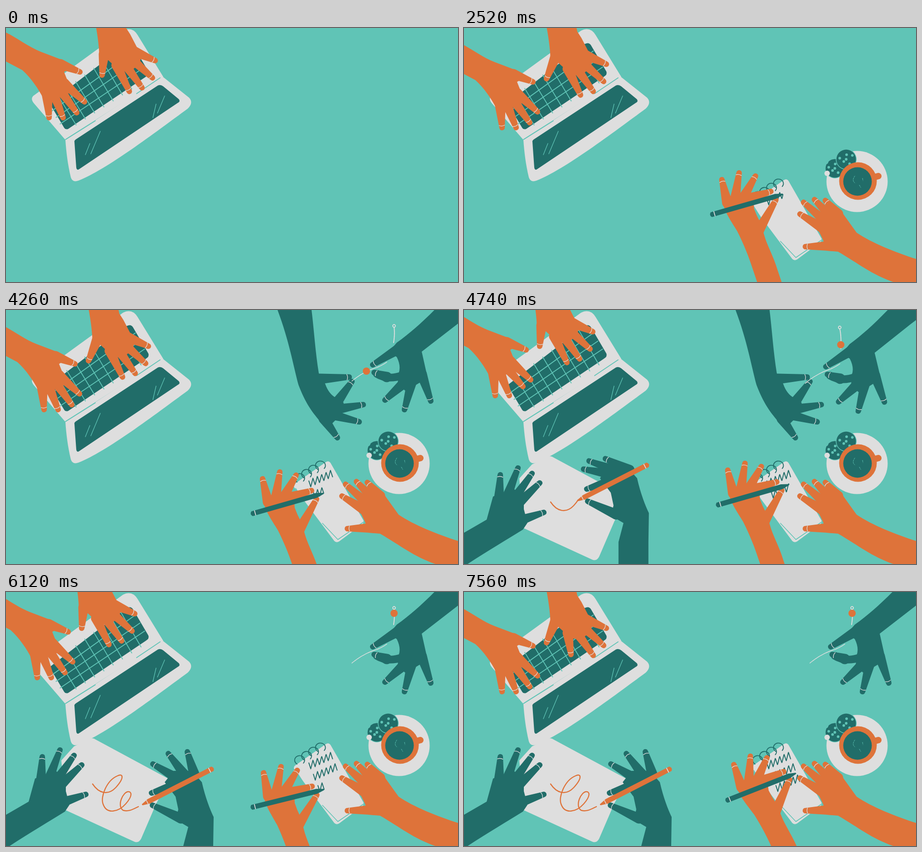
Animation, 997 px wide and 561 px high, one loop 7.62 s. Source, as an HTML page with a canvas:

```html
<!DOCTYPE html>
<html lang="en">
<head>
<meta charset="utf-8">
<title>Busy hands</title>
<style>
html, body { margin: 0; width: 100%; height: 100%; overflow: hidden; background: #60c4b6; }
canvas { display: block; width: 997px; height: 561px; }
</style>
</head>
<body>
<canvas id="stage" width="997" height="561"></canvas>
<script>
const ctx = document.getElementById('stage').getContext('2d');
const TEAL = '#60c4b6', DARK = '#216d69', ORANGE = '#de733a', GREY = '#dedede';
const LOOP = 7620, STEP = 60;

// ---------- helpers ----------
const clamp = x => Math.max(0, Math.min(1, x));
const mix = (a, b, u) => a + (b - a) * u;
const mixPt = (p, q, u) => p.map((v, i) => mix(v, q[i], u));
const span = (t, a, b) => clamp((t - a) / (b - a));
const ease = u => u * u * (3 - 2 * u);

function shape(d, color) {
  ctx.fillStyle = color;
  ctx.fill(new Path2D(d));
}
function disc(x, y, r, color) {
  ctx.fillStyle = color;
  ctx.beginPath();
  ctx.arc(x, y, r, 0, 7);
  ctx.fill();
}
function stroke(d, color, width, dash = []) {
  ctx.strokeStyle = color;
  ctx.lineWidth = width;
  ctx.lineCap = ctx.lineJoin = 'round';
  ctx.setLineDash(dash);
  ctx.stroke(new Path2D(d));
  ctx.setLineDash([]);
}
function line(pts, color, width) {
  if (pts.length > 1) stroke('M' + pts.map(p => p.join()).join('L'), color, width);
}
function placed(dx, dy, draw, deg = 0, px = 0, py = 0) {
  ctx.save();
  ctx.translate(dx + px, dy + py);
  ctx.rotate(deg * Math.PI / 180);
  ctx.translate(-px, -py);
  draw();
  ctx.restore();
}
// Tapered limb with a pale nail line, drawn along its own axis
function finger([x0, y0], [x1, y1], color, r0 = 11.5, r1 = 6) {
  const len = Math.hypot(x1 - x0, y1 - y0), k = Math.acos((r0 - r1) / len);
  ctx.save();
  ctx.translate(x0, y0);
  ctx.rotate(Math.atan2(y1 - y0, x1 - x0));
  ctx.fillStyle = color;
  ctx.beginPath();
  ctx.arc(0, 0, r0, k, 2 * Math.PI - k);
  ctx.arc(len, 0, r1, -k, k);
  ctx.fill();
  stroke(`M${len - 5},${-r1}q3,${r1} 0,${2 * r1}`, GREY, 1.3);
  ctx.restore();
}
// Finger roots are spread evenly from knuckle a to knuckle b
function hand(palm, color, a, b, tips, thumbs) {
  shape(palm, color);
  tips.forEach((tip, i) => finger(mixPt(a, b, i / (tips.length - 1)), tip, color));
  thumbs.forEach(([root, tip]) => finger(root, tip, color));
}
function pencil(x0, y0, x1, y1, color, lead) {
  const len = Math.hypot(x1 - x0, y1 - y0);
  ctx.save();
  ctx.translate(x1, y1);
  ctx.rotate(Math.atan2(y1 - y0, x1 - x0));
  shape(`M${-len + 3},-5.5L-17,-5.5L-1,-1.5Q1,0 -1,1.5L-17,5.5L${-len + 3},5.5Q${-len - 3},0 ${-len + 3},-5.5Z`, color);
  stroke(`M${-len + 10},-5v10`, GREY, 1.8);
  if (lead) stroke('M-13,-4v8', GREY, 1.6);
  ctx.restore();
}

// ---------- laptop ----------
function laptop() {
  shape('M60,150Q53,157 63,168L130,246L347,108L290,15Q278,-4 258,6Z', GREY);
  shape('M131,247L345,107L404,154Q414,165 401,178C330,230 220,314 160,337Q147,342 143,330C136,300 133,275 131,247Z', GREY);
  shape('M96,166L265,36Q275,30 280,38L314,96Q317,103 308,108L137,223Q131,225 128,220Z', DARK);
  const at = (u, v) => mixPt(mixPt([96, 166], [275, 33], u), mixPt([132, 224], [316, 104], u), v);
  for (let i = 1; i < 4; i++) line([at(-.02, i / 4), at(1, i / 4)], TEAL, 2);
  for (let i = 1; i < 9; i++) line([at(i / 9, -.05), at(i / 9, 1.06)], TEAL, 1.8);
  stroke('M132,246L197,205M288,145L340,110', TEAL, 1.8);
  shape('M151,252Q150,249 154,246L335,127Q341,124 347,129L381,157Q386,162 378,166L161,312Q156,315 155,308Z', DARK);
  stroke('M208,228L187,278M185,255L175,280M350,150L334,188M331,168L324,198', TEAL, 1.3);
}

// Rest spots: arrival time, left offset, right offset
const SPOTS = [
  [0, 0, 0, 0, 0], [480, -11, 22, -15, 8], [1140, 0, 0, -23, 0],
  [2280, -11, 22, -15, 8], [4740, -26, -9, -45, -24], [6900, -11, 22, -15, 8]
];
function typing(t) {
  const i = Math.max(0, SPOTS.findLastIndex(s => s[0] - 420 <= t));
  const beat = Math.floor(t / 100);
  const u = i ? ease(span(beat * 100, SPOTS[i][0] - 420, SPOTS[i][0] - 60)) : 0;
  const [, lx, ly, rx, ry] = mixPt(SPOTS[Math.max(0, i - 1)], SPOTS[i], u);
  const leftTap = beat % 8 === 7 ? 9 : 0, rightTap = beat % 8 === 3;
  placed(lx, ly, () => hand(
    'M-60,-22L0,10C25,22 50,42 78,53L120,69L150,85L128,97L134,112L142,142L126,150L98,156L82,155C72,135 55,110 36,93L0,74L-60,45Z',
    ORANGE, [91, 150], [128, 122],
    [[95, 198], [126, 198], [156, 187 - leftTap], [173, 163]], [[[120, 80], [163, 97]]]));
  placed(rx, ry, () => hand(
    'M188,-60L199,0C204,30 206,50 206,75L222,68L252,95L275,95L292,82L300,62L288,41L274,14L265,0L252,-60Z',
    ORANGE, [244, 82], [283, 52],
    [rightTap ? [251, 130] : [272, 140], [300, 132], [323, 110], [329, 72]],
    [[[216, 58], [mix(212, 197, clamp(ly / 22)), 104]]]));
}

// ---------- notebook and coffee ----------
function cookie(x, y, r) {
  disc(x, y, r + 1.5, TEAL);
  disc(x, y, r, DARK);
  for (let i = 0; i < 6; i++) {
    const a = i * 2.4, d = r * .75 * Math.sqrt(i / 5);
    disc(x + d * Math.cos(a), y + d * Math.sin(a), 2.9, TEAL);
  }
}
function coffee() {
  disc(867, 339, 67.5, GREY);
  cookie(818, 310, 20.5);
  disc(801, 321, 6, GREY);
  disc(798, 295, 6, TEAL);
  cookie(843, 290, 21.5);
  stroke('M900,331L914,327', ORANGE, 14);
  disc(869, 338, 41.5, ORANGE);
  disc(868, 339, 31.5, DARK);
  stroke('M862,327Q855,337 862,342M872,347L875,352M879,332L880,337', TEAL, 1, [3, 2]);
}

const ROWS = 3, FIRST = 1440, EACH = 2130, WRITE = 1600;
function zig(row, u) {
  const wave = Math.asin(Math.cos((u - .08) * 11 * Math.PI)) * 2 / Math.PI;
  return [668 + 10 * row + 53 * u, 384 + 25 * row - 24 * u + 8.5 * wave];
}
function penTip(t) {
  const row = Math.max(0, Math.min(ROWS - 1, Math.floor((t - FIRST) / EACH)));
  const s = t - FIRST - row * EACH;
  const next = row < ROWS - 1 ? zig(row + 1, 0) : [731, 397];
  return mixPt(zig(row, span(s, 0, WRITE)), next, ease(span(s, WRITE, 1950)));
}
function notebook(t) {
  shape('M704,337Q711,331 716,338L788,464Q791,469 786,473L735,511Q729,515 724,510L636,392Q633,387 638,383Z', GREY);
  stroke('M698,471L732,507L789,468M639,394L658,424', TEAL, 1.6);
  for (let i = 0; i < 4; i++)
    stroke(`M${642 + 15.3 * i},${380 - 9.3 * i}a11,10 0 1 1 14,-2`, DARK, 1.8);
  for (let row = 0; row < ROWS; row++) {
    const u = span(t - FIRST - row * EACH, 0, WRITE), pts = [];
    for (let v = 0; v < u; v += .01) pts.push(zig(row, v));
    line(pts, DARK, 2);
  }
  hand('M1060,532L997,510C950,495 900,475 866,452L833,406L805,404L785,412L776,435L792,468L800,492L825,494C870,520 900,545 947,561L1000,600Z',
    ORANGE, [825, 411], [790, 441],
    [[797, 381], [773, 379], [749, 385], [741, 411]], [[[812, 481], [753, 483]]]);
  const [x, y] = penTip(t);
  const tilt = 2 * span(t, 5600, 5900) - 7.5 * ease(span(t, 6300, 7500));
  placed(x - 676, y - 393, () => {
    hand('M542,405L570,396L610,392L612,425L618,440L626,456L634,482C640,505 655,530 664,561L694,650L640,650L610,561C600,530 590,505 575,475C560,450 545,430 542,405Z',
      ORANGE, [553, 412], [602, 402],
      [[541, 361], [579, 346], [615, 353], [649, 387]], [[[623, 472], [660, 406]]]);
    pencil(515, 439, 676, 393, DARK);
  }, tilt, 676, 393);
}

// ---------- beads ----------
function beading(t) {
  const pull = ease(span(t, 4440, 5100)) * (1 - ease(span(t, 5280, 5760)));
  const sway = Math.sin(t / 130) * 2 * span(t, 2640, 2800) * (1 - span(t, 4080, 4240));
  const [rx, ry] = mixPt([856 + sway, 35], [793, 43], pull);
  const low = mixPt([855, 72], [800, 104], pull);
  stroke(`M${rx},${ry + 3}Q${rx + 2 + 4 * pull},${ry + 18} ${low}`, GREY, 2, [5, 1]);
  stroke(`M${rx - 3},${ry}a3,3 0 1 1 0,.1`, GREY, 1.8);

  const strung = t >= 4500;
  const bead = strung
    ? mixPt(low, [rx + 4 * pull, ry + 12], ease(span(t, 4560, 5100)))
    : mixPt(mixPt([774, 149], [795, 135], ease(span(t, 2700, 3900))), [812, 128], span(t, 4290, 4500));
  if (strung) disc(...bead, 8, ORANGE);

  const out = ease(span(t, 5580, 5940));
  if (out < 1) placed(-110 * out, -330 * out, () => hand(
    'M588,-30L599,0C625,70 633,120 645,165C660,205 675,225 692,245L715,255L735,235L745,205L728,194Q712,186 704,163L690,140C682,90 680,50 674,0L672,-30Z',
    DARK, [727, 220], [701, 240], [[788, 209], [779, 247], [731, 282]],
    [[[692, 152], [757, 148]], [[730, 204], [763, 158]]]));

  placed(-25 * pull, 10 * pull, () => {
    stroke('M818,141Q842,156 875,144', DARK, 17);
    hand('M990,-40L945,0C915,30 890,52 862,72L845,92L862,104Q872,124 866,140L864,162L880,178L905,165L930,150L917,92L997,30L1080,-30Z',
      DARK, [877, 162], [917, 142], [[836, 199], [879, 220], [937, 201]],
      [[[866, 86], [809, 121]], [[840, 148], [812, 138]]]);
    stroke('M763,157Q782,141 806,131Q826,125 840,115', GREY, 1.5, [6, 1]);
  }, -2 * pull, 803, 120);
  if (!strung) disc(...bead, 8, ORANGE);
}

// ---------- drawing ----------
const LOOPS = 'M191,424C205,445 225,450 242,432C262,410 258,400 246,406C222,416 208,452 214,468C222,492 248,486 264,468C280,450 277,441 270,441C258,441 244,472 258,482C270,486 280,480 292,474';
const track = document.createElementNS('http://www.w3.org/2000/svg', 'path');
track.setAttribute('d', LOOPS);
const TOTAL = track.getTotalLength();

function paper() {
  shape('M182,326Q190,320 198,326L361,414L332,466L298,545Q292,556 282,551L132,482L122,372L150,341Z', GREY);
}
function drawing(t) {
  const drawn = TOTAL * span(t, 4500, 5615);
  if (drawn) stroke(LOOPS, ORANGE, 2.4, [drawn, TOTAL * 2]);
  hand('M-30,508L0,492L50,463L64,412L110,395L132,415L132,440L140,470L130,485C95,507 55,530 8,561L-40,600Z',
    DARK, [77, 420], [119, 428],
    [[80, 364], [119, 349], [150, 361], [167, 382]], [[[120, 466], [176, 447]]]);

  const open = ease(span(t, 5580, 5880));
  const at = track.getPointAtLength(drawn);
  const [x, y] = mixPt([at.x, at.y], [302, 468], open);
  placed(x - 302, y - 468, () => {
    hand('M391,640L391,561L402,519L375,503L380,480L374,452L350,420L370,395L410,395L432,420C440,455 450,480 458,497L457,561L457,640Z',
      DARK, [378, 412], [415, 402],
      [mixPt([314, 400], [324, 380], open), mixPt([326, 382], [358, 357], open), mixPt([362, 377], [400, 353], open)],
      [[[378, 425], [321, 444]], [[386, 500], [323, 471]]]);
    pencil(458, 389, 300, 470, ORANGE, true);
  });
}

// ---------- loop ----------
function render(t) {
  ctx.fillStyle = TEAL;
  ctx.fillRect(0, 0, 997, 561);
  if (t >= 4440) paper();
  laptop();
  typing(t);
  if (t >= 1320) {
    coffee();
    notebook(t);
  }
  if (t >= 2640) beading(t);
  if (t >= 4440) drawing(t);
}
const start = performance.now();
function tick() {
  const t = Math.max(0, performance.now() - start) % LOOP;
  render(Math.floor(t / STEP) * STEP);
  requestAnimationFrame(tick);
}
tick();
</script>
</body>
</html>
```
